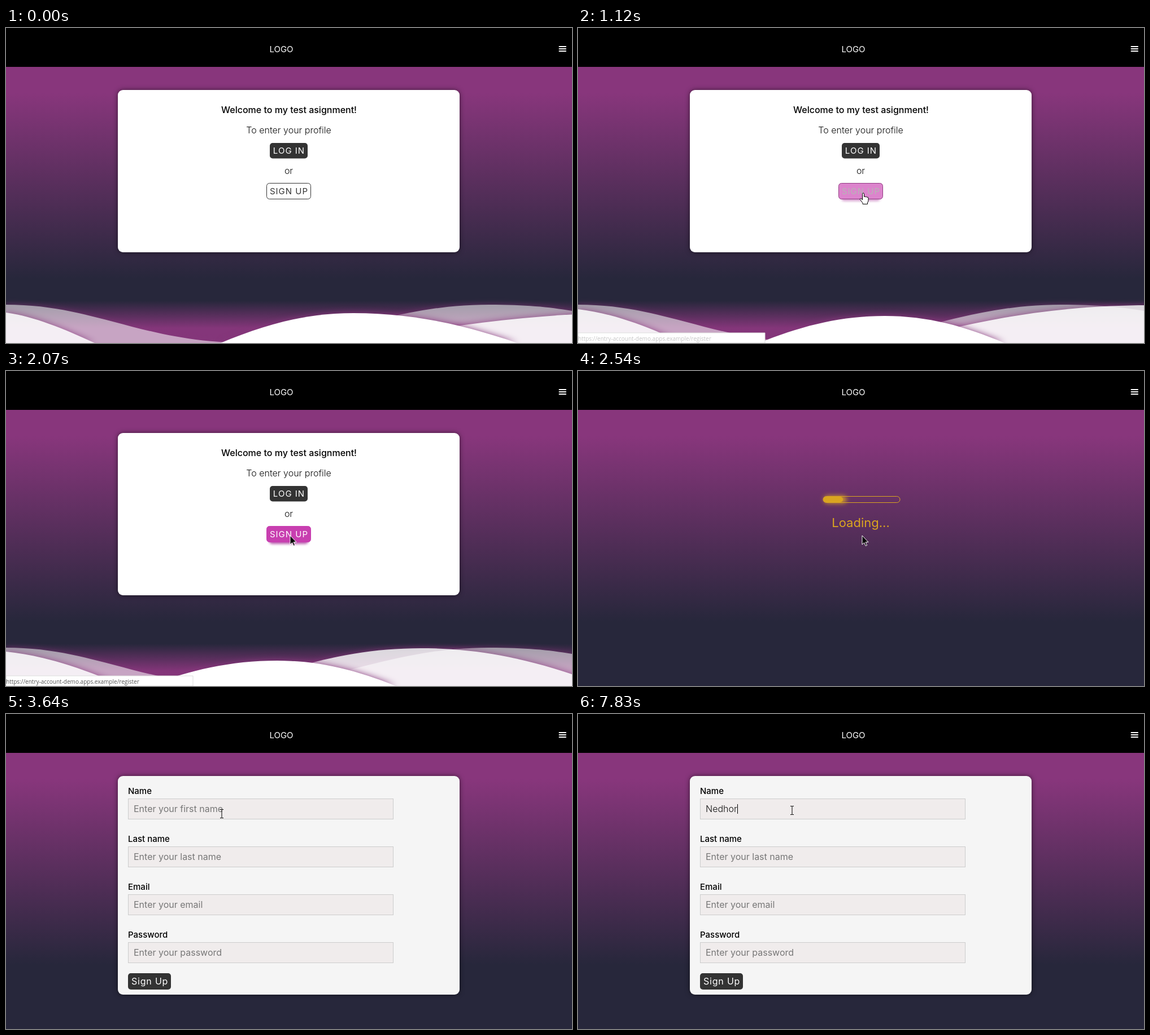
Animation of 1002 by 559 pixels, one loop 8 s. Source, as an HTML page:

```html
<!DOCTYPE html>
<html lang="en">
<head>
<meta charset="utf-8">
<title>Sign up flow</title>
<style>
  html, body { margin: 0; width: 100%; height: 100%; overflow: hidden; background: #27273b; }
  svg { display: block; width: 1002px; height: 559px; }
  text { font: 400 16px Inter, "Open Sans", sans-serif; }
  .mid { text-anchor: middle; }
  .light { font-weight: 300; fill: #111; }
  .strong { font-weight: 500; }
  .caps { font-size: 15px; letter-spacing: 1px; }
  .label { font-size: 15px; font-weight: 500; }
  .hint { fill: #777; }
  .field { fill: #f0ecec; stroke: #ccc; }
  .panel { filter: drop-shadow(0 0 4px rgba(0, 0, 0, .55)); }
  .status { font: 10px "Open Sans", "Noto Sans", sans-serif; fill: #555; }
  .wave { fill: #fff; filter: drop-shadow(0 0 6px #84367a); }
</style>
</head>
<body>
<svg viewBox="0 0 1002 559">
  <defs>
    <linearGradient id="sky" gradientUnits="userSpaceOnUse" x1="0" y1="115" x2="0" y2="445">
      <stop stop-color="#88367c"/><stop offset="1" stop-color="#27273b"/>
    </linearGradient>
    <linearGradient id="glow" x1="0" y1="0" x2="0" y2="1">
      <stop stop-color="#84367a" stop-opacity="0"/><stop offset=".65" stop-color="#84367a"/>
    </linearGradient>
    <filter id="blur" x="-50%" y="-150%" width="200%" height="400%"><feGaussianBlur stdDeviation="4"/></filter>
    <filter id="soft" x="-20%" y="-50%" width="140%" height="200%"><feGaussianBlur stdDeviation="2"/></filter>
  </defs>

  <rect width="1002" height="559" fill="url(#sky)"/>
  <rect width="1002" height="69"/>
  <text class="mid" x="487.5" y="43" fill="#fff" style="font-size:15px">LOGO</text>
  <path d="M979.5 33h11.5m-11.5 4h11.5m-11.5 4h11.5" stroke="#fff" stroke-width="2" stroke-linecap="round"/>

  <g id="welcome">
    <rect y="484" width="1002" height="75" fill="url(#glow)"/>
    <path class="wave" opacity=".55" d="M0 491C160 491 240 559 432 559C570 559 680 491 855 491C920 491 960 495 1002 502V570H0Z"/>
    <path class="wave" id="sideWave" opacity=".82"/>
    <path class="wave" id="farWave" opacity=".82"/>
    <path class="wave" id="nearWave"/>
    <rect class="panel" x="198" y="110" width="605" height="288" rx="9" fill="#fff"/>
    <text class="mid strong" x="501" y="151">Welcome to my test asignment!</text>
    <text class="mid light" x="500.5" y="187">To enter your profile</text>
    <rect x="467" y="204" width="67" height="27.5" rx="5" fill="#333"/>
    <text class="mid caps" x="501" y="223" fill="#fff">LOG IN</text>
    <text class="mid light" x="500.5" y="259">or</text>
    <rect id="buttonShade" x="466" y="282" width="69" height="25" rx="5" fill="#a8359a" filter="url(#soft)"/>
    <rect id="button" x="461.5" y="275.5" width="78" height="28" rx="5"/>
    <text id="buttonText" class="mid caps" x="501" y="295">SIGN UP</text>
    <g id="status">
      <path d="M0 541H331V559H0Z" fill="#fff" stroke="#ddd"/>
      <text id="statusText" class="status" x="0" y="555">https://entry-account-demo.apps.example/register</text>
    </g>
  </g>

  <g id="loading">
    <rect id="barGlow" x="436" y="222" height="12" rx="5" fill="#daa520" filter="url(#blur)"/>
    <rect id="bar" x="434" y="223" height="10" rx="5" fill="#daa520"/>
    <rect x="434" y="222.5" width="136" height="11" rx="5.5" fill="none" stroke="#daa520"/>
    <text class="mid" x="500.5" y="277" fill="#daa520" style="font-size:22px">Loading...</text>
  </g>

  <g id="form">
    <rect class="panel" x="198" y="110" width="605" height="388" rx="9" fill="#f5f5f5"/>
    <g id="fields"></g>
    <rect x="216" y="460" width="76" height="29" rx="5" fill="#333"/>
    <text x="222" y="479.5" fill="#fff" style="letter-spacing:.8px">Sign Up</text>
    <text id="value" class="light" x="226" y="173.5"></text>
    <rect id="caret" y="160" width="1" height="17"/>
  </g>

  <g id="pointer">
    <path id="arrow" d="M0 0V16L3.7 12.6 6.2 18.3 8.6 17.3 6.1 11.7H11Z" stroke="#fff"/>
    <path id="hand" transform="translate(2 1)" fill="#fff" stroke="#000" d="M-1.5 10V1.5a1.5 1.5 0 0 1 3 0V6.5q1.5-1.2 2.7.3 1.5-.8 2.5.5 2.3-.6 2.3 1.5V13q0 2-1.5 4V19.5H-1V17.5L-5.5 11.5q-.8-1.8 1-2 1.6.2 3 2.5Z"/>
    <path id="beam" fill="none" stroke="#000" d="M-3 -7.5h2.5l.5.5.5-.5h2.5M0 -7V7M-3 7.5h2.5l.5-.5.5.5h2.5"/>
  </g>
</svg>
<script>
const LOOP = 8000, LOADING = 2460, FORM = 2630, FOCUS = 3890, BLINK = 540;
const NAME = "Nedhor";
const KEYS = [5890, 6050, 6430, 6520, 6670, 7830];

const $ = id => document.getElementById(id);
const set = (id, attrs) => { for (const k in attrs) $(id).setAttribute(k, attrs[k]); };
const show = (id, on) => { $(id).style.display = on ? "" : "none"; };
const clamp = v => Math.min(1, Math.max(0, v));
const mix = (a, b, k) => a.map((v, i) => v + (b[i] - v) * k);
const rgb = c => `rgb(${c.map(Math.round)})`;

// Rows are [time, ...values]; the last segment extrapolates.
function pose(rows, t) {
  let i = 0;
  while (i < rows.length - 2 && t >= rows[i + 1][0]) i++;
  const a = rows[i], b = rows[i + 1];
  return mix(a, b, (t - a[0]) / (b[0] - a[0])).slice(1);
}

// left foot, peak x, right foot, peak y
const NEAR = [[0, 380, 615, 905, 506], [1120, 320, 543, 755, 511], [2070, 250, 480, 690, 514]];
const FAR = [[0, 620, 1149, 1500, 504], [1120, 560, 1010, 1340, 492], [2070, 420, 735, 1060, 492]];
// y at the left edge, foot x
const SIDE = [[0, 505, 157], [1120, 499, 185], [2070, 498, 207]];
const TRACK = [[480, 610, 559], [800, 553, 337], [1040, 503, 292], [3250, 503, 292],
               [3640, 382, 177], [3880, 379, 171], [LOOP, 379, 171]];

function hump([left, peak, right, top]) {
  const shoulder = 559 - (559 - top) * .62;
  const side = (foot, k) => foot + (peak - foot) * k;
  return `M${left} 559C${side(left, .33)} ${shoulder} ${side(left, .64)} ${top} ${peak} ${top}` +
         `C${side(right, .64)} ${top} ${side(right, .33)} ${shoulder} ${right} 559Z`;
}

function drawWelcome(t) {
  const [edge, foot] = pose(SIDE, t);
  set("nearWave", { d: hump(pose(NEAR, t)) });
  set("farWave", { d: hump(pose(FAR, t)) });
  set("sideWave", { d: `M0 ${edge}C${foot * .32} ${edge + 7} ${foot * .64} ${edge + 28} ${foot} 559H0Z` });

  const hover = clamp((t - 980) / 220);
  const dark = [51, 51, 51], white = [255, 255, 255], pink = [200, 63, 176];
  set("button", { fill: rgb(mix(white, pink, hover)), stroke: rgb(mix(dark, pink, hover)) });
  set("buttonText", { fill: rgb(mix(dark, white, hover)) });
  set("buttonShade", { opacity: hover * .8 });
  show("status", t >= 1040);
  set("statusText", { opacity: clamp((t - 1040) / 240) });
}

function drawLoading(t) {
  const width = 8 + 27 * clamp((t - LOADING) / 80);
  set("bar", { width });
  set("barGlow", { width: width + 4 });
}

function drawForm(t) {
  const typed = KEYS.filter(k => t >= k).length;
  const lastInput = typed ? KEYS[typed - 1] : FOCUS;
  $("value").textContent = NAME.slice(0, typed);
  show("firstHint", !typed);
  show("caret", t >= FOCUS && Math.floor((t - lastInput) / BLINK) % 2 === 0);
  set("caret", { x: typed ? Math.round(226 + $("value").getComputedTextLength()) : 226 });
}

function drawPointer(t) {
  const [x, y] = pose(TRACK, t);
  const overField = t >= FORM && y < 356 && (y - 150) % 85 < 36;
  const overButton = t >= 1000 && t < 1910;
  show("pointer", t >= TRACK[0][0]);
  set("pointer", { transform: `translate(${Math.round(x)} ${Math.round(y)})` });
  show("beam", overField);
  show("hand", overButton);
  show("arrow", !overField && !overButton);
}

["Name", "Last name", "Email", "Password"].forEach((label, i) => {
  const hint = i ? label.toLowerCase() : "first name";
  $("fields").innerHTML += `<g transform="translate(0 ${i * 85})">
    <text class="label" x="216" y="142">${label}</text>
    <rect class="field" x="216.5" y="150.5" width="469" height="36"/>
    <text class="hint" ${i ? "" : 'id="firstHint"'} x="226" y="173.5">Enter your ${hint}</text></g>`;
});

const start = performance.now();
function frame() {
  const t = (performance.now() - start) % LOOP;
  const scene = t < LOADING ? "welcome" : t < FORM ? "loading" : "form";
  for (const id of ["welcome", "loading", "form"]) show(id, id === scene);
  ({ welcome: drawWelcome, loading: drawLoading, form: drawForm })[scene](t);
  drawPointer(t);
  requestAnimationFrame(frame);
}
frame();
</script>
</body>
</html>
```
